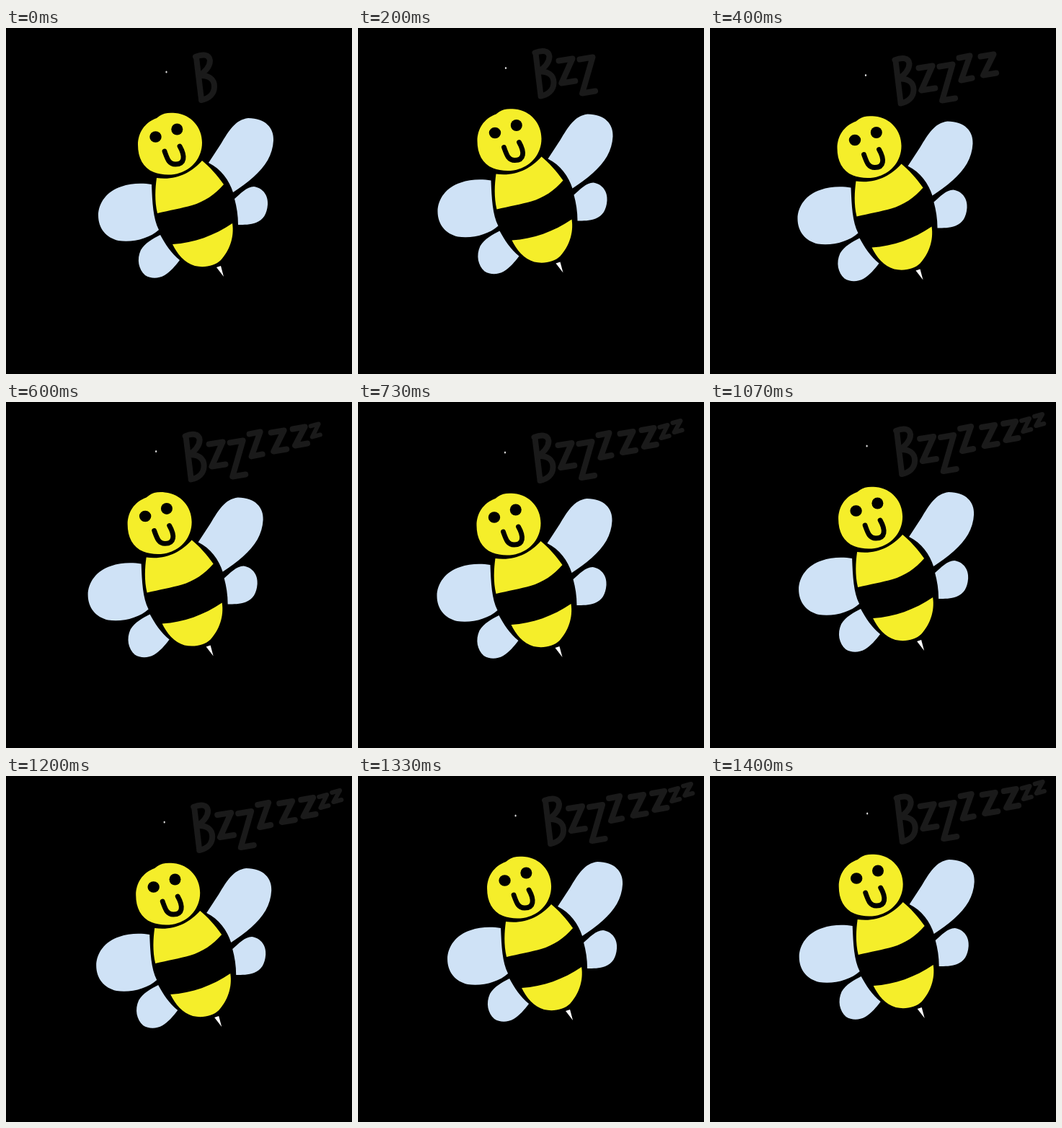
These frames come from a looping animation (480x480 px, 1470 ms). An HTML page:

```html
<!DOCTYPE html>
<html lang="en">
<head>
<meta charset="utf-8">
<title>Buzzing bee</title>
<style>
  html, body { margin: 0; width: 100%; height: 100%; overflow: hidden; background: #000; }
  svg { display: block; width: 100vw; height: 100vh; }
  .wing { fill: #cfe2f6; }
  .skin { fill: #f5ee2a; }
  .ink { fill: none; stroke: #000; stroke-width: 6.8; stroke-linecap: round; }
  #buzz { fill: none; stroke: #1a1a1a; stroke-width: 8; stroke-linecap: round; stroke-linejoin: round; }
</style>
</head>
<body>
<svg viewBox="0 0 480 480">
  <g id="bee">
    <g class="wing">
      <path d="M281 187L298 161C309 143 318 127 336 125C360 125 372 139 371 156C370 176 360 192 343 207C334 215 325 221 315 228C310 212 298 195 281 187Z"/>
      <path d="M317 237C325 230 334 220 344 220C357 222 364 233 363 245C362 258 357 266 347 270C339 273 330 273 322 273C322 260 320 248 317 237Z"/>
      <path d="M202 217C190 215 173 215 160 220C140 226 128 243 128 260C128 278 139 291 156 295C176 298 199 292 212 280C204 264 203 242 202 217Z"/>
      <path d="M214 287C204 292 193 298 187 308C181 321 184 335 193 343C201 348 211 348 220 343C228 338 235 330 241 322C229 312 221 300 214 287Z"/>
    </g>
    <g class="skin">
      <path d="M209 125L213 122C218 118 226 117 235 118C257 120 272 138 272 159C272 180 258 196 241 201C230 205 215 204 205 200C190 194 183 180 183 162C183 146 192 131 209 125Z"/>
      <path d="M209 208C235 212 257 201 272 184C282 192 293 204 302 217C290 231 275 241 258 246C244 250 227 253 210 257C206 240 207 222 209 208Z"/>
      <path d="M231 300C261 298 289 288 314 271C317 290 310 309 298 322C290 330 275 333 262 330C248 326 237 313 231 300Z"/>
    </g>
    <ellipse cx="207.5" cy="151" rx="8.2" ry="7.8"/>
    <circle cx="237.3" cy="140.5" r="8"/>
    <path class="ink" d="M220 171C224 182 226 189 235 189C248 189 249 178 241 164"/>
    <path fill="#fff" d="M292 332L298 330L302 345Z"/>
    <ellipse cx="222.5" cy="61" rx="1.1" ry="1.5" fill="#ddd"/>
    <g id="buzz">
      <path d="M264 41L271 99M263 40C272 36 282 36 283 45C283 54 276 60 269 66C281 65 289 71 289 81C289 92 281 98 271 100"/>
    </g>
  </g>
</svg>
<script>
  const LOOP = 1470, STEPS = 22;
  const bee = document.getElementById('bee');
  const buzz = document.getElementById('buzz');

  // Turning points of the flight: step, dx, dy
  const keys = [
    [0, 0, 0], [3, -17.5, -5.5], [6, -6.5, 4.5], [11, -18.5, 9],
    [14, -7, -3], [18, -2.8, 3], [21, -4.3, -9], [STEPS, 0, 0]
  ];

  function position(step) {
    const n = keys.findIndex(k => k[0] > step);
    const [a, ...from] = keys[n - 1], [b, ...to] = keys[n];
    const ease = (1 - Math.cos(Math.PI * (step - a) / (b - a))) / 2;
    return from.map((v, i) => v + (to[i] - v) * ease);
  }

  function addZ(x, y, w, h) {
    const z = document.createElementNS('http://www.w3.org/2000/svg', 'path');
    z.setAttribute('d', `M${x} ${y + 3}l${w} -3l${-0.8 * w} ${h}l${w} -3`);
    if (h < 20) z.setAttribute('style', 'stroke-width: 6');
    buzz.append(z);
  }
  addZ(296, 48, 19, 34);
  addZ(325, 46, 18, 50);
  addZ(352, 34, 15, 34);
  addZ(382, 32, 18, 29);
  addZ(412, 27, 17, 26);
  addZ(437, 23, 11, 18);
  addZ(455, 17, 11, 16);

  const letters = [...buzz.children];
  const start = performance.now();

  function draw() {
    const t = (performance.now() - start) % LOOP;
    const step = Math.min(STEPS - 1, Math.floor((t + 4) * 3 / 200));
    const typed = 1 + Math.floor(step * 2 / 3);
    bee.setAttribute('transform', `translate(${position(step)})`);
    letters.forEach((el, n) => el.setAttribute('visibility', n < typed ? 'visible' : 'hidden'));
    requestAnimationFrame(draw);
  }
  draw();
</script>
</body>
</html>
```
